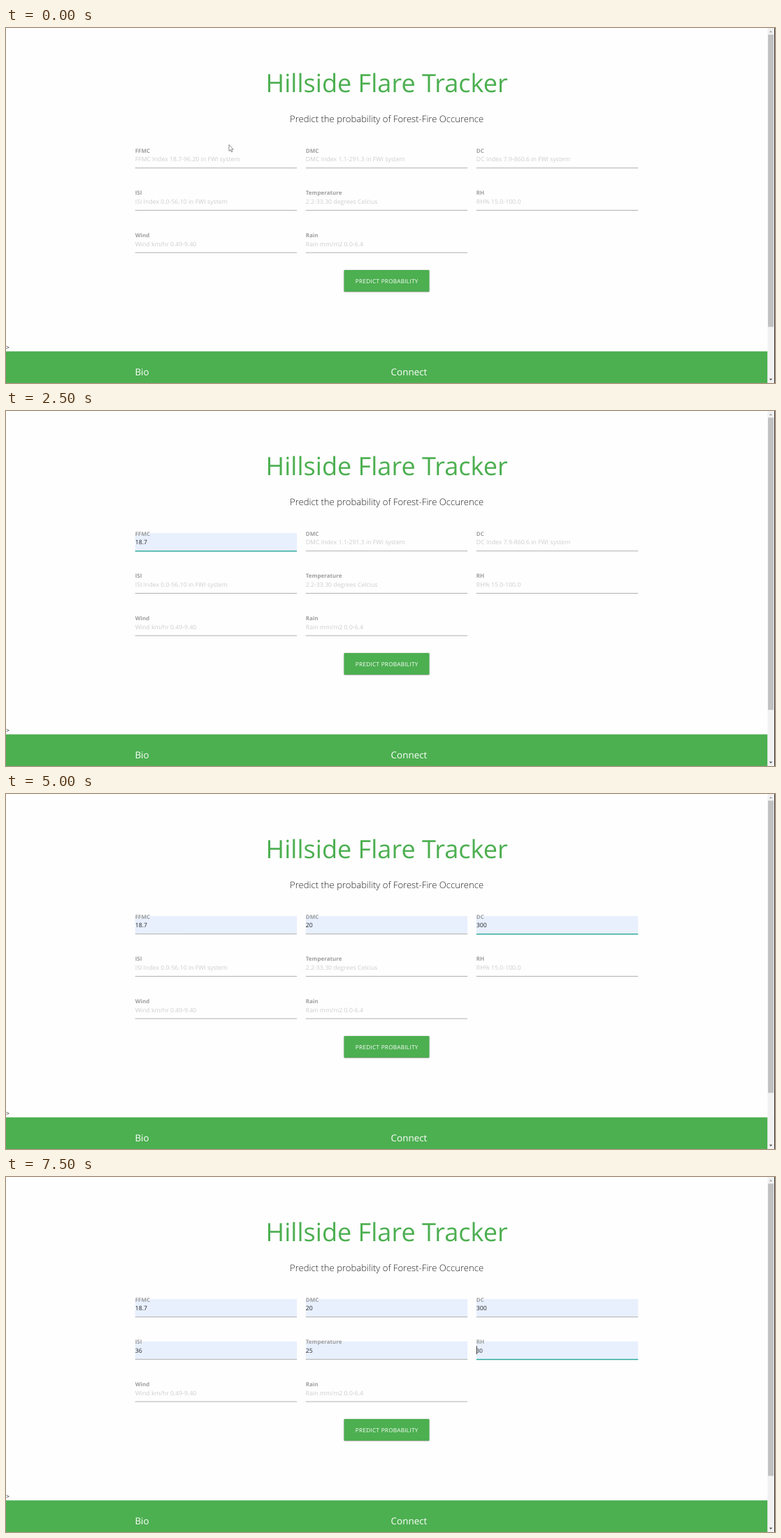
Animation, 1100 px wide and 509 px high, one loop 8000 ms. Source, as an HTML page:

```html
<!DOCTYPE html>
<html lang="en">
<head>
<meta charset="utf-8">
<title>Hillside Flare Tracker</title>
<style>
  html, body { margin: 0; width: 100%; height: 100%; overflow: hidden; background: #fefefe; }
  svg { display: block; width: 100vw; height: 100vh; }
  text { font-family: "Open Sans", "Noto Sans", sans-serif; font-size: 8.72px; text-rendering: geometricPrecision; }
  .mid { text-anchor: middle; }
  .title { font-size: 36.1px; fill: #4caf50; }
  .lead { font-size: 13.12px; font-weight: 300; fill: #222; }
  .label { font-size: 8px; font-weight: 700; fill: #9e9e9e; }
  .hint { fill: #cdcdcd; }
  .value { fill: #262626; }
  .value.preview { font-size: 8px; }
  .line { fill: #b0b0b0; }
  .line.pending { fill: #93a8a5; }
  .line.focus { fill: #26a69a; }
  .area { fill: #e8f0fe; }
  .caret { fill: #333; }
  .btn { font-size: 8.2px; letter-spacing: .27px; fill: #fff; }
  .foot { font-size: 13.45px; fill: #fff; }
  .button { filter: drop-shadow(0 1px .6px rgba(0, 0, 0, .2)) drop-shadow(0 .5px 1.2px rgba(0, 0, 0, .18)); }
</style>
</head>
<body>
<svg id="stage" viewBox="0 0 1100 509" preserveAspectRatio="none">
  <rect width="1100" height="509" fill="#fefefe"/>
  <text class="title mid" x="544.6" y="92.3">Hillside Flare Tracker</text>
  <text class="lead mid" x="544.6" y="134.8">Predict the probability of Forest-Fire Occurence</text>

  <g id="form"></g>

  <rect class="button" x="483.5" y="347" width="122" height="31" rx="1" fill="#4caf50"/>
  <text class="btn mid" x="544.7" y="365.8">PREDICT PROBABILITY</text>

  <text x="0" y="461.2" fill="#222">&gt;</text>
  <rect y="463.6" width="1089.4" height="46" fill="#4caf50"/>
  <text class="foot" x="184.4" y="498.4">Bio</text>
  <text class="foot" x="550.6" y="498.4">Connect</text>

  <rect x="1089.4" width="9.6" height="509" fill="#f1f1f1"/>
  <rect x="1090" y="9.5" width="8" height="419" fill="#c1c1c1"/>
  <path d="M1091.8 6.2L1094 3.8L1096.2 6.2Z" fill="#a3a3a3"/>
  <path d="M1091.8 502.8L1094 505.2L1096.2 502.8Z" fill="#505050"/>
  <rect x="1099" width="1" height="509" fill="#2a2a2a"/>

  <path id="pointer" d="M0 0V9.2L2.1 7.3L3.5 10.5L4.9 9.9L3.5 6.8H6.2Z"
        fill="#fff" stroke="#444" stroke-width=".6" stroke-linejoin="round"/>
</svg>
<script>
const LOOP = 8000, STEP = 500;
const NS = "http://www.w3.org/2000/svg";
const form = document.getElementById("form");
const pointer = document.getElementById("pointer");

// caret: caret enters, on: suggestion shows, ok: value accepted, off: focus leaves
const fields = [
  { label: "FFMC", hint: "FFMC Index 18.7-96.20 in FWI system", value: "18.7", caret: 1000, on: 1500, ok: 2000, off: 3000 },
  { label: "DMC", hint: "DMC Index 1.1-291.3 in FWI system", value: "20", caret: 3000, on: 3000, ok: 3500, off: 4000 },
  { label: "DC", hint: "DC Index 7.9-860.6 in FWI system", value: "300", caret: 4000, on: 4000, ok: 4500, off: 5500 },
  { label: "ISI", hint: "ISI Index 0.0-56.10 in FWI system", value: "36", caret: 5500, on: 5500, ok: 5500, off: 6500 },
  { label: "Temperature", hint: "2.2-33.30 degrees Celcius", value: "25", caret: 6000, on: 6500, ok: 7000, off: 7500 },
  { label: "RH", hint: "RH% 15.0-100.0", value: "30", caret: 7500, on: 7500, ok: 8000, off: 8000 },
  { label: "Wind", hint: "Wind km/hr 0.49-9.40" },
  { label: "Rain", hint: "Rain mm/m2 0.0-6.4" }
];

const pointerStops = [
  { from: 0, to: 500, x: 319, y: 167.3 },
  { from: 3500, to: 4000, x: 699.4, y: 202 }
];

function add(parent, tag, attrs, text = "") {
  const el = document.createElementNS(NS, tag);
  for (const key in attrs) el.setAttribute(key, attrs[key]);
  el.textContent = text;
  return parent.appendChild(el);
}

function show(el, on) {
  el.setAttribute("visibility", on ? "visible" : "hidden");
}

const hasFocus = (f, t) => t >= f.on && t < f.off;

function build(field, i) {
  const x = 184.7 + (i % 3) * 244.05;
  const y = 175 + Math.floor(i / 3) * 60.7;
  const g = add(form, "g", { transform: `translate(${x} ${y})` });
  field.area = add(g, "rect", { class: "area", width: 231.4, height: 25.5 });
  add(g, "text", { class: "label", x: 0, y: 3.5 }, field.label);
  field.hintText = add(g, "text", { class: "hint", x: 0, y: 16.2 }, field.hint);
  field.valueText = add(g, "text", { class: "value", x: 0, y: 16.2 }, field.value);
  field.line = add(g, "rect", { class: "line", y: 25.2, width: 231.4 });
  field.bar = add(g, "rect", { class: "caret", y: 6.7, width: 1, height: 11.8 });
}

function drawField(f, t, idle) {
  const filled = t >= f.on;
  const accepted = t >= f.ok;
  const focus = hasFocus(f, t);
  show(f.area, filled);
  show(f.valueText, filled);
  show(f.hintText, !filled);
  f.valueText.classList.toggle("preview", filled && !accepted);
  f.line.classList.toggle("focus", focus);
  f.line.classList.toggle("pending", idle && t >= f.caret);
  f.line.setAttribute("height", focus ? 1.4 : 1);
  show(f.bar, t >= f.caret && t < f.ok + STEP);
  f.bar.setAttribute("x", accepted ? f.valueText.getComputedTextLength() - 0.4 : 0);
}

function draw(t) {
  const idle = !fields.some(f => hasFocus(f, t));
  fields.forEach(f => drawField(f, t, idle));
  const stop = pointerStops.find(s => t >= s.from && t < s.to);
  show(pointer, stop);
  if (stop) pointer.setAttribute("transform", `translate(${stop.x} ${stop.y})`);
}

function tick() {
  const t = performance.now() % LOOP;
  draw(Math.floor(t / STEP) * STEP);
  requestAnimationFrame(tick);
}

fields.forEach(build);
tick();
</script>
</body>
</html>
```
